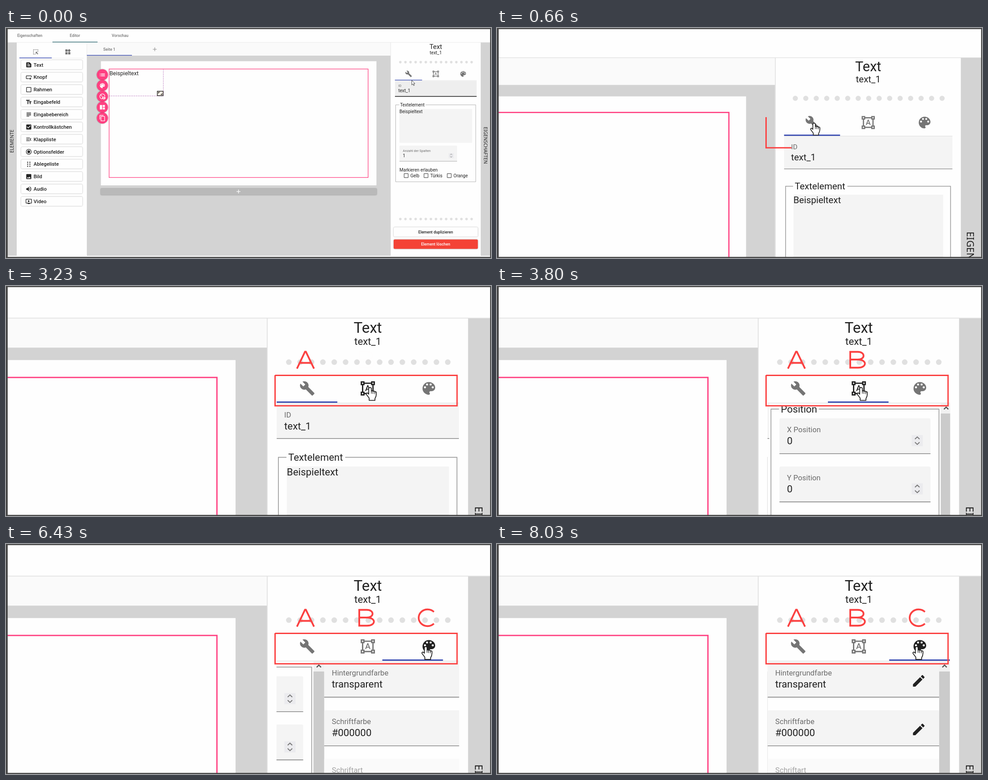
These frames come from a looping animation (1086x516 px, 9.13 s). An HTML page:

```html
<!DOCTYPE html>
<html lang="de">
<head>
<meta charset="utf-8">
<title>Editor</title>
<style>
html, body { margin: 0; width: 100%; height: 100%; overflow: hidden; background: #fefefe; }
svg { display: block; width: 1086px; height: 516px; font-family: Roboto, sans-serif; }
.raised { filter: drop-shadow(0 .8px .8px rgba(0, 0, 0, .38)); }
</style>
</head>
<body>
<svg id="stage" viewBox="0 0 1086 516"></svg>
<script>
const LOOP = 9130, ZOOM = 2.23, PANEL_W = 183;
const BLUE = '#3f51b5', PINK = '#ff4081', RED = '#fb4141', GRAY = '#d3d3d3', MUTED = '#757575', INK = '#212121';

const PATHS = {
  wrench: 'M22.7 19l-9.1-9.1c.9-2.3.4-5-1.5-6.9-2-2-5-2.4-7.4-1.3L9 6 6 9 1.6 4.7C.4 7.1.9 10.1 2.9 12.1c1.9 1.9 4.6 2.4 6.9 1.5l9.1 9.1c.4.4 1 .4 1.4 0l2.3-2.3c.5-.4.5-1.1.1-1.4z',
  frame: 'M23 7V1h-6v2H7V1H1v6h2v10H1v6h6v-2h10v2h6v-6h-2V7zM3 3h2v2H3zm2 18H3v-2h2zm12-2H7v-2H5V7h2V5h10v2h2v10h-2zm4 2h-2v-2h2zM19 5V3h2v2zm-5.27 9h-3.49l-.73 2H7.89l3.4-9h1.4l3.41 9h-1.63zm-3.04-1.26h2.61L12 8.91z',
  palette: 'M12 3a9 9 0 0 0 0 18c.83 0 1.5-.67 1.5-1.5 0-.39-.15-.74-.39-1.01-.23-.26-.38-.61-.38-.99 0-.83.67-1.5 1.5-1.5H16c2.76 0 5-2.24 5-5 0-4.42-4.03-8-9-8z' +
    [[6.5, 10.5], [9.5, 6.5], [14.5, 6.5], [17.5, 10.5]].map(([x, y]) => `M${x - 1.5} ${y}a1.5 1.5 0 1 0 3 0a1.5 1.5 0 1 0-3 0z`).join(''),
  pencil: 'M3 17.25V21h3.75L17.81 9.94l-3.75-3.75zM20.71 7.04c.39-.39.39-1.02 0-1.41l-2.34-2.34c-.39-.39-1.02-.39-1.41 0l-1.83 1.83 3.75 3.75z',
  widgets: 'M13 13v8h8v-8zM3 21h8v-8H3zM3 3v8h8V3zm13.66-1.31L11 7.34 16.66 13l5.66-5.66z',
  select: 'M3 3h3v2H5v1H3zM8 3h3v2H8zM13 3h3v2h-3zM18 3h3v3h-2V5h-1zM3 8h2v3H3zM3 13h2v3H3zM3 18h2v1h1v2H3zM8 19h3v2H8zM19 8h2v3h-2zM12 12h7l-2.5 2.5L21 19l-2 2-4.500-4.500L12 19z',
  doc: 'M5 3h10l6 6v10a2 2 0 0 1-2 2H5a2 2 0 0 1-2-2V5a2 2 0 0 1 2-2zM7 7v2h6V7zM7 11v2h10v-2zM7 15v2h10v-2z',
  button: 'M4 6h16a2 2 0 0 1 2 2v4h-2V8H4v8h8v2H4a2 2 0 0 1-2-2V8a2 2 0 0 1 2-2zM17 12l1.500 3.500L22 17l-3.500 1.500L17 22l-1.500-3.500L12 17l3.500-1.500z',
  square: 'M5 3h14a2 2 0 0 1 2 2v14a2 2 0 0 1-2 2H5a2 2 0 0 1-2-2V5a2 2 0 0 1 2-2zM5 5v14h14V5z',
  letters: 'M2.5 4v3h5v12h3V7h5V4zm19 5h-9v3h3v7h3v-7h3z',
  lines: 'M14 17H4v2h10zm6-8H4v2h16zM4 15h16v-2H4zM4 5v2h16V5z',
  check: 'M19 3H5a2 2 0 0 0-2 2v14a2 2 0 0 0 2 2h14a2 2 0 0 0 2-2V5a2 2 0 0 0-2-2zm-9 14l-5-5 1.41-1.41L10 14.17l7.59-7.59L19 8z',
  menu: 'M3 18h13v-2H3zM3 13h10v-2H3zm0-7v2h13V6zm18 9.59L17.42 12 21 8.41 19.59 7l-5 5 5 5z',
  radio: 'M2 12a10 10 0 1 0 20 0a10 10 0 1 0-20 0zM4 12a8 8 0 1 0 16 0a8 8 0 1 0-16 0zM7 12a5 5 0 1 1 10 0a5 5 0 1 1-10 0z',
  grip: [5, 12, 19].map(y => [8, 16].map(x => `M${x - 2} ${y}a2 2 0 1 0 4 0a2 2 0 1 0-4 0z`).join('')).join(''),
  image: 'M21 19V5a2 2 0 0 0-2-2H5a2 2 0 0 0-2 2v14a2 2 0 0 0 2 2h14a2 2 0 0 0 2-2zM8.5 13.5l2.5 3.01L14.5 12l4.5 6H5z',
  sound: 'M3 9v6h4l5 5V4L7 9zm13.5 3c0-1.77-1.02-3.29-2.5-4.03v8.05c1.48-.73 2.5-2.25 2.5-4.02zM14 3.23v2.06a7 7 0 0 1 0 13.42v2.06a9 9 0 0 0 0-17.54z',
  video: 'M21 3H3a2 2 0 0 0-2 2v12a2 2 0 0 0 2 2h5v2h8v-2h5a2 2 0 0 0 2-2V5a2 2 0 0 0-2-2zm0 14H3V5h18zm-5-6l-7 4V7z',
  list: 'M3 13h2v-2H3zm0 4h2v-2H3zm0-8h2V7H3zm4 4h14v-2H7zm0 4h14v-2H7zM7 7v2h14V7z',
  hidden: 'M2 12a10 10 0 0 1 20 0h-2a8 8 0 0 0-13-6.200L13 12l-1.400 1.400L5.700 7.200A8 8 0 0 0 11 20v2a10 10 0 0 1-9-10zM11 17.500a6 4.500 0 0 1 12 0a6 4.500 0 0 1-12 0zM15 17.500a2 2 0 1 0 4 0a2 2 0 1 0-4 0z',
  quilt: 'M3 4h8v16H3zM13 4h8v7h-8zM13 13h8v7h-8z',
  copy: 'M16 1H4a2 2 0 0 0-2 2v14h2V3h12zm3 4H8a2 2 0 0 0-2 2v14a2 2 0 0 0 2 2h11a2 2 0 0 0 2-2V7a2 2 0 0 0-2-2zm0 16H8V7h11z'
};

const rect = (x, y, x2, y2, fill, extra = '') =>
  `<rect x="${x}" y="${y}" width="${x2 - x}" height="${y2 - y}" fill="${fill}" ${extra}/>`;
const line = (d, color, width = .6, extra = '') =>
  `<path d="${d}" fill="none" stroke="${color}" stroke-width="${width}" ${extra}/>`;
const text = (x, y, s, size = 10, fill = INK, extra = '') =>
  `<text x="${x}" y="${y}" font-size="${size}" fill="${fill}" ${extra}>${s}</text>`;
const centered = (x, y, s, size, fill, weight = 400) =>
  text(x, y, s, size, fill, `text-anchor="middle" font-weight="${weight}"`);
const icon = (name, cx, cy, size = 15, fill = INK, id = '') =>
  `<path id="${id || name + cx + cy}" d="${PATHS[name]}" fill="${fill}" fill-rule="evenodd" transform="translate(${cx - size / 2} ${cy - size / 2}) scale(${size / 24})"/>`;
const dots = y => Array.from({ length: 15 }, (_, i) =>
  `<circle cx="${883 + i * 11.4}" cy="${y}" r="2.8" fill="#e0e0e0"/>`).join('');
const spinner = (x, y) => rect(x - 5.6, y - 5.6, x + 5.6, y + 5.6, '#ebebee') +
  line(`M${x - 2.3} ${y - 1.6}l2.300-2.200 2.300 2.200M${x - 2.3} ${y + 1.6}l2.300 2.200 2.300-2.200`, '#777', .9);
const field = (x, y, x2, y2, label, value) =>
  rect(x, y, x2, y2, '#f4f4f4', 'rx="1.500"') + line(`M${x} ${y2}H${x2}`, '#858585', .7) +
  text(x + 7.6, y + 14, label, 7.5, '#6b6b6b') + text(x + 7.6, y + 26.1, value);
const fieldset = (x2, y, y2, gapEnd, legend) =>
  line(`M880.600 ${y}H872.500V${y2}H${x2}V${y}H${gapEnd}`, '#999', .75) + text(882.4, y + 3.6, legend);
const scrollbar = rect(1043, 118, 1053.8, 300, '#f1f1f1') + rect(1043, 128.3, 1053.8, 300, '#cbcbcb') +
  line('M1046.200 124l2.200-2.200 2.200 2.200', '#505050', 1.1);

const elements = [['doc', 'Text'], ['button', 'Knopf'], ['square', 'Rahmen'], ['letters', 'Eingabefeld'],
  ['lines', 'Eingabebereich'], ['check', 'Kontrollkästchen'], ['menu', 'Klappliste'], ['radio', 'Optionsfelder'],
  ['grip', 'Ablegeliste'], ['image', 'Bild'], ['sound', 'Audio'], ['video', 'Video']];

const leftSide = () =>
  rect(3, 32.5, 24, 511, GRAY) +
  text(0, 0, 'ELEMENTE', 10.5, INK, 'text-anchor="middle" font-family="Noto Sans, sans-serif" transform="translate(17.300 254) rotate(-90)"') +
  icon('select', 66.5, 53.5, 15, MUTED) + icon('widgets', 138.5, 53.5, 15, MUTED) +
  line('M30 67.700H174', '#e2e2e2') + rect(30, 66.4, 102.5, 67.9, BLUE) +
  elements.map(([name, label], i) => {
    const y = 82.4 + i * 27.86;
    return rect(34, y - 10.3, 171, y + 10.3, '#fefefe', 'rx="2.500" class="raised"') +
      icon(name, 51, y + .3) + text(61.7, y + 4.1, label, 11.3, INK, 'font-weight="500"');
  }).join('');

const workspace = () =>
  rect(181, 32.5, 861, 62, '#fafafa') + rect(181, 62, 861, 511, GRAY) + line('M181 33V62', '#ddd') +
  centered(231.3, 50.5, 'Seite 1', 8.8, MUTED, 500) + line('M328.800 47.700h8.600M333.100 43.400v8.600', '#8a8a8a', 1.1) +
  rect(181, 60.6, 282, 62, BLUE) +
  rect(212.5, 74.5, 829.5, 353, '#fefefe') +
  line('M231 152.400H352.300V92', '#a348a8', .9, 'stroke-dasharray="2 2"') +
  rect(230.9, 92, 810.8, 335.4, 'none', `stroke="${PINK}" stroke-width="1.300"`) +
  text(231.7, 105.5, 'Beispieltext', 12.6) +
  rect(338.8, 141.8, 351.8, 151.8, '#fff6e8', 'stroke="#111" stroke-width="1.300"') +
  line('M341.300 147v-2.800h3M349.300 146.600v2.800h-3', '#111', 1.2) +
  ['list', 'palette', 'hidden', 'quilt', 'copy'].map((name, i) => {
    const y = 105 + i * 24.25;
    return `<circle cx="215.800" cy="${y}" r="12.500" fill="${PINK}" class="raised"/>` + icon(name, 215.8, y, 15, '#fff');
  }).join('') +
  rect(212, 360, 830, 374.5, '#b9b9b9', 'rx="2" class="raised"') +
  line('M516.200 366.800h8.800M520.600 362.400v8.800', '#fff', 1.3);

const modelPanel = () =>
  rect(870.8, 118.2, 1053.8, 153.5, '#f4f4f4', 'id="idBox"') + line('M870.800 153.500H1053.800', '#858585', .7, 'id="idLine"') +
  text(878.4, 132.1, 'ID', 7.5, '#6b6b6b') + text(878.4, 144.2, 'text_1') +
  fieldset(1051.8, 172.4, 345, 939.6, 'Textelement') +
  rect(881, 181.6, 1043.8, 257.5, '#f4f4f4') + text(881, 190.8, 'Beispieltext') +
  field(881, 263.7, 1010, 299, 'Anzahl der Spalten', '1') + spinner(996.8, 286.3) +
  text(881, 321.8, 'Markieren erlauben') +
  [['Gelb', 896], ['Türkis', 940.5], ['Orange', 992.5]].map(([label, x]) =>
    rect(x - 4.5, 326.7, x + 4.5, 335.7, 'none', 'rx=".8" stroke="#555" stroke-width="1.200"') + text(x + 9.5, 334.7, label)).join('');

const positionPanel = () =>
  fieldset(1041.2, 123.8, 300, 920.5, 'Position') +
  ['X', 'Y'].map((axis, i) => {
    const y = 133.1 + i * 48.5;
    return field(881, y, 1032.7, y + 35.6, axis + ' Position', '0') + spinner(1019.4, y + 22.5);
  }).join('') + scrollbar;

const stylePanel = () =>
  [['Hintergrundfarbe', 'transparent'], ['Schriftfarbe', '#000000']].map(([label, value], i) => {
    const y = 118.4 + i * 48.9;
    return field(870.8, y, 1043, y + 35.7, label, value) + icon('pencil', 1022.5, y + 19.3, 15.5);
  }).join('') +
  rect(870.8, 216.2, 1043, 252, '#fafafa') + text(878.4, 230, 'Schriftart', 7.5, '#a3a3a3') + scrollbar;

const rightSide = () =>
  rect(861, 32.5, 1063, 511, '#fefefe') + line('M861.300 32.500V511', '#dcdcdc', .7) +
  rect(1063, 32.5, 1086, 511, GRAY) +
  text(0, 0, 'EIGENSCHAFTEN', 10.5, INK, 'font-family="Noto Sans, sans-serif" transform="translate(1069.700 221.800) rotate(90)"') +
  centered(962.3, 47, 'Text', 14.9, INK) + centered(962.3, 59.4, 'text_1', 10, INK) +
  dots(76.6) + dots(428.6) +
  icon('wrench', 901.5, 103, 15.8, MUTED) + icon('frame', 962.3, 103, 15.6, MUTED, 'frameIcon') +
  icon('palette', 1023.6, 103, 17, MUTED, 'paletteIcon') +
  line('M870.800 117.800H1053.800', '#dcdcdc') +
  `<g clip-path="url(#content)">${[modelPanel, positionPanel, stylePanel].map(p => `<g class="panel">${p()}</g>`).join('')}</g>` +
  rect(870.8, 116.1, 931.7, 117.5, BLUE, 'id="tabInk"') +
  rect(868, 447, 1056.5, 468, '#fefefe', 'rx="2.500" class="raised"') + centered(962, 460.6, 'Element duplizieren', 8.8, INK, 500) +
  rect(868, 474.6, 1056.5, 495.6, '#f44336', 'rx="2.500" class="raised"') + centered(962, 488.3, 'Element löschen', 8.8, '#fff', 500);

const cursor = `<g id="cursor">
  <path id="arrow" d="M0 0V10.500L2.400 8.200 4.200 12 5.800 11.200 4.100 7.600H7.200Z" fill="#fff" stroke="#222" stroke-width=".8"/>
  <g id="hand" transform="scale(${1 / ZOOM})" stroke="#222" stroke-width="1.800" stroke-linejoin="round">
    <path d="M-1 1C-3 1-4 2.500-4 4V16L-6 14C-8 12.500-10.500 14.500-9 17L-3 25V30H10V26C12 23 13 20 13 16V12.500C13 10 9.500 10 9.500 12V11C9.500 8.500 5.500 8.500 5.500 10.500V10C5.500 8 2 8 2 9.500V4C2 2.500 1 1-1 1Z" fill="#fff"/>
    <path d="M2 9.500v5.500M5.500 10.500v5M9.500 12v4" fill="none" stroke-width="1.300"/>
  </g></g>`;

const marks = {
  A: 'M651.500 185.300L669.500 147.500H671.500L689.700 185.300M658 172.500H683',
  B: 'M808 165C825 165 825 147.800 808 147.800H791V183.200H808.500C829 183.200 829 165 808 165H791',
  C: 'M958.200 152.300A20 18.700 0 1 0 958.200 178.700'
};

const stage = document.getElementById('stage');
stage.innerHTML =
  `<defs><clipPath id="content">${rect(870.6, 118.2, 1054, 400, '#000')}</clipPath></defs>` +
  rect(0, 0, 1086, 516, '#fefefe') +
  `<g id="scene">` +
  centered(53.3, 20.4, 'Eigenschaften', 8.8, MUTED, 500) + centered(154.3, 20.4, 'Editor', 8.8, MUTED, 500) +
  centered(255.5, 20.4, 'Vorschau', 8.8, MUTED, 500) + leftSide() + workspace() + rightSide() +
  line('M0 32.300H1086', '#dedede') + rect(104, 30.8, 205, 32.2, '#2f6b74') + cursor + '</g>' +
  line('M602.500 200V268.700H1010V200.500H602.500', RED, 3, 'id="box" pathLength="1"') +
  Object.entries(marks).map(([k, d]) => line(d, RED, 3.9, `id="mark${k}" aria-label="${k}"`)).join('') +
  `<path d="M0 0H1086V516H0ZM3.800 2.500V513.500H1084V2.500Z" fill="#464646" fill-rule="evenodd"/>`;

const $ = id => document.getElementById(id);
const panels = [...document.querySelectorAll('.panel')];
const ramp = (t, from, duration) => Math.min(1, Math.max(0, (t - from) / duration));
const inOut = p => p < .5 ? 2 * p * p : 1 - 2 * (1 - p) ** 2;

// cubic-bezier(.35, 0, .25, 1)
function tabEase(x) {
  let lo = 0, hi = 1;
  for (let i = 0; i < 24; i++) {
    const u = (lo + hi) / 2, v = 1 - u;
    if (1.05 * v * v * u + .75 * v * u * u + u ** 3 < x) lo = u; else hi = u;
  }
  return x <= 0 ? 0 : x >= 1 ? 1 : 3 * lo * lo - 2 * lo ** 3;
}

const spots = { rest: [908.6, 117.3], wrench: [903.9, 103.2], frame: [965, 101.6], palette: [1019.1, 102.9], hover: [1020.9, 102.7] };

function cursorAt(t) {
  const glide = (a, b, p, dip) => [a[0] + (b[0] - a[0]) * p, a[1] + (b[1] - a[1]) * p + dip * Math.sin(Math.PI * p)];
  if (t < 1400) return glide(spots.rest, spots.wrench, t < 30 ? 0 : t < 60 ? .33 : t < 100 ? .67 : 1, 0);
  if (t < 4000) return glide(spots.wrench, spots.frame, inOut(ramp(t, 1650, 500)), 12.5);
  if (t < 5500) return glide(spots.frame, spots.palette, inOut(ramp(t, 4610, 510)), 9.5);
  return spots.hover;
}

function draw(t) {
  const zoom = 1 + (ZOOM - 1) * inOut(ramp(t, 300, 490));
  $('scene').setAttribute('transform', `translate(${1086 * (1 - zoom)} 0) scale(${zoom})`);

  const hover = t < 30 ? 1 : t < 60 ? .67 : t < 100 ? .33 : 0;
  const shade = 244 - 6 * hover, edge = 133 - 110 * hover;
  $('idBox').setAttribute('fill', `rgb(${shade},${shade},${shade})`);
  $('idLine').setAttribute('stroke', `rgb(${edge},${edge},${edge})`);
  $('idLine').setAttribute('stroke-width', .7 + .6 * hover);

  $('cursor').setAttribute('transform', `translate(${cursorAt(t)})`);
  $('arrow').style.display = t < 60 ? '' : 'none';
  $('hand').style.display = t < 60 ? 'none' : '';

  const tab = tabEase(ramp(t, 3359, 500)) + tabEase(ramp(t, 6189, 500));
  panels.forEach((p, i) => p.setAttribute('transform', `translate(${(i - tab) * PANEL_W} 0)`));
  $('tabInk').setAttribute('x', 870.8 + tab * PANEL_W / 3);
  $('frameIcon').setAttribute('fill', t >= 2000 && t < 6189 ? INK : MUTED);
  $('paletteIcon').setAttribute('fill', t >= 5500 ? INK : MUTED);

  const drawn = ramp(t, 595, 500);
  $('box').style.display = drawn ? '' : 'none';
  $('box').setAttribute('stroke-dasharray', drawn < 1 ? `${drawn} 2` : 'none');
  $('markA').style.opacity = ramp(t, 1400, 390);
  $('markB').style.opacity = ramp(t, 3230, 390);
  $('markC').style.opacity = ramp(t, 6030, 390);
}

const start = performance.now();
function tick() {
  draw((performance.now() - start) % LOOP);
  requestAnimationFrame(tick);
}
tick();
</script>
</body>
</html>
```
